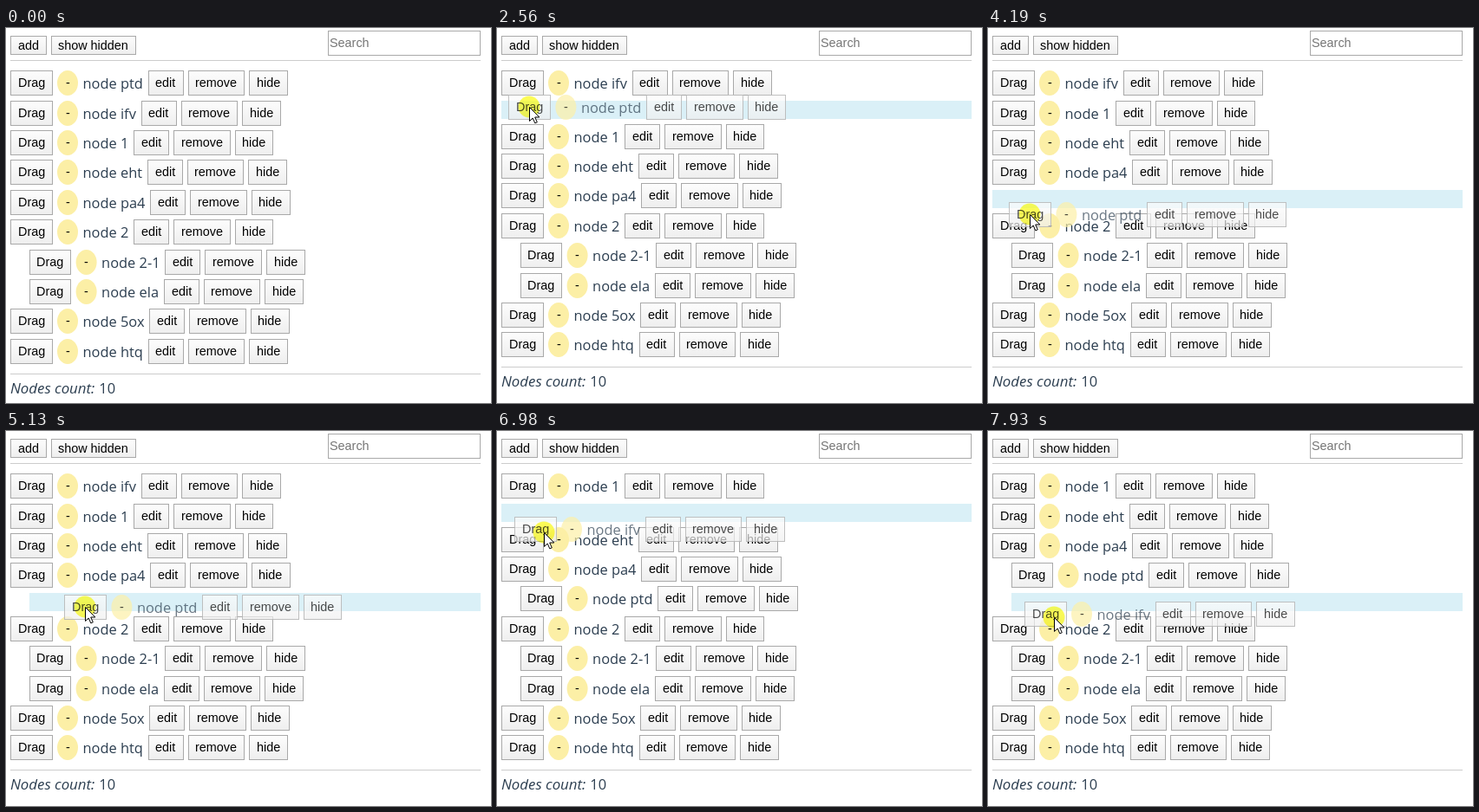
An HTML page with a canvas that plays this animation: 559x433 px, repeating every 8 s.

```html
<!DOCTYPE html>
<html lang="en">
<head>
<meta charset="utf-8">
<title>Draggable node list</title>
<style>
html, body { margin: 0; width: 559px; height: 433px; overflow: hidden; background: #fff; }
canvas { display: block; }
</style>
</head>
<body>
<canvas id="stage" width="559" height="433"></canvas>
<script>
const ctx = document.getElementById('stage').getContext('2d');
const LOOP = 8000;
const LEFT = 5, RIGHT = 547, INDENT = 21.6, GAP = 5;
const TOP = 49.35, PITCH = 34.38, ROW_H = 29, SLOT_H = 21.6, SLOT_SHIFT = -7.5;
const BUTTON_FONT = '14.4px "Liberation Sans", Arial, sans-serif';
const NODE_FONT = '16.4px "Open Sans", "Noto Sans", sans-serif';
const COUNT_FONT = 'italic 16.9px "Open Sans", "Noto Sans", sans-serif';
const INK = '#2c3e50';

const node = (name, depth = 0) => ({ name, depth });
const ptd = node('ptd'), ifv = node('ifv');
const middle = ['1', 'eht', 'pa4'].map(name => node(name));
const tail = [node('2'), node('2-1', 1), node('ela', 1), node('5ox'), node('htq')];
const before = [ptd, ifv, ...middle, ...tail];
const after = [ifv, ...middle, node('ptd', 1), ...tail];

const drags = [
  { press: 2030, start: 2110, end: 5360, item: ptd, grabX: 23.6, grabY: 14 },
  { press: 6600, start: 6670, end: LOOP, item: ifv, grabX: 34, grabY: 18 }
];

// The pointer rests between these moves.
const entry = { x: 410, y: 440 };
const moves = [
  { from: 0, to: 840, x: 146, y: 266 },
  { from: 840, to: 1630, x: 30, y: 87 },
  { from: 1650, to: 1880, x: 29, y: 63 },
  { from: 2110, to: 3180, x: 51, y: 136 },
  { from: 3180, to: 3790, x: 47, y: 180 },
  { from: 3880, to: 4300, x: 48, y: 222 },
  { from: 4440, to: 5130, x: 91, y: 203 },
  { from: 5290, to: 5670, x: 92, y: 231 },
  { from: 5750, to: 6450, x: 41, y: 69 },
  { from: 6600, to: 7370, x: 67, y: 166 },
  { from: 7380, to: 7930, x: 76, y: 215 }
];

function pointerAt(t) {
  let { x, y } = entry;
  for (const move of moves) {
    const k = Math.min(1, Math.max(0, (t - move.from) / (move.to - move.from)));
    const eased = k * k * (3 - 2 * k);
    x += (move.x - x) * eased;
    y += (move.y - y) * eased;
  }
  return { x: Math.round(x), y: Math.round(y) };
}

// Draws text and returns its width.
function text(str, x, y, font, color) {
  ctx.font = font;
  ctx.fillStyle = color;
  ctx.fillText(str, x, y);
  return ctx.measureText(str).width;
}

function rect(x, y, w, h, color) {
  ctx.fillStyle = color;
  ctx.fillRect(x, y, w, h);
}

const inside = (p, x, y, w, h) => p && p.x >= x && p.x < x + w && p.y >= y && p.y < y + h;

// Draws a button and returns where the next one starts.
function button(label, left, y, h, pointer) {
  ctx.font = BUTTON_FONT;
  const right = left + ctx.measureText(label).width + 17.6;
  const x = Math.round(left), w = Math.round(right) - x;
  const shade = ctx.createLinearGradient(0, y, 0, y + h);
  shade.addColorStop(0, '#fdfdfd');
  shade.addColorStop(1, '#eee');
  rect(x, y, w, h, shade);
  ctx.lineWidth = 1;
  ctx.strokeStyle = inside(pointer, x, y, w, h) ? '#666' : '#a9a9a9';
  ctx.strokeRect(x + 0.5, y + 0.5, w - 1, h - 1);
  text(label, Math.round(left + 8.7), Math.round(y + h / 2 + 4.5), BUTTON_FONT, '#000');
  return right + GAP;
}

function row(item, x, y, pointer) {
  if (inside(pointer, x, y, RIGHT - x, ROW_H)) rect(x, y, RIGHT - x, ROW_H, '#f4f4f4');
  button('Drag', x, y, ROW_H, pointer);
  ctx.fillStyle = '#fcefa6';
  ctx.beginPath();
  ctx.ellipse(x + 66, y + 14.5, 12, 14.5, 0, 0, Math.PI * 2);
  ctx.fill();
  text('-', Math.round(x + 63.6), y + 19, BUTTON_FONT, '#000');
  const nameX = x + 83.5;
  let next = nameX + text('node ' + item.name, nameX, y + 21, NODE_FONT, INK) + 5.9;
  for (const label of ['edit', 'remove', 'hide']) {
    next = button(label, next, y, ROW_H, pointer);
  }
}

function toolbar(pointer) {
  const next = button('add', LEFT, 9, 22, pointer);
  button('show hidden', next, 9, 22, pointer);
  ctx.strokeStyle = '#a9a9a9';
  ctx.strokeRect(371.5, 3.5, 175, 28);
  text('Search', 373, 22, BUTTON_FONT, '#757575');
  rect(LEFT, 37, RIGHT - LEFT, 1, '#ccc');
}

function footer(shift) {
  rect(LEFT, 399 + shift, RIGHT - LEFT, 1, '#ccc');
  const labelW = text('Nodes count:', LEFT, 422 + shift, COUNT_FONT, INK);
  text('10', LEFT + labelW + GAP, 422 + shift, NODE_FONT, INK);
}

function list(items, slot, slotDepth, pointer) {
  items.forEach((item, i) => {
    const y = TOP + PITCH * i;
    if (i === slot) {
      const x = Math.round(LEFT + slotDepth * INDENT), top = Math.round(y);
      rect(x, top, RIGHT - x, Math.round(y + SLOT_H) - top, '#daf0f7');
    }
    const shift = i >= slot ? PITCH + SLOT_SHIFT : 0;
    row(item, LEFT + item.depth * INDENT, Math.round(y + shift), pointer);
  });
}

function drawPointer({ x, y }, pressed) {
  ctx.save();
  if (pressed) {
    ctx.globalCompositeOperation = 'multiply';
    ctx.fillStyle = '#ffff58';
    ctx.beginPath();
    ctx.arc(x, y, 12.5, 0, Math.PI * 2);
    ctx.fill();
    ctx.globalCompositeOperation = 'source-over';
  }
  ctx.translate(x + 0.5, y + 0.5);
  const arrow = new Path2D('M0 0V16L3.7 12.5L6.3 18.4L8.8 17.3L6.2 11.5H11.3Z');
  ctx.fillStyle = '#fff';
  ctx.fill(arrow);
  ctx.strokeStyle = '#000';
  ctx.stroke(arrow);
  ctx.restore();
}

function draw(t) {
  const pointer = pointerAt(t);
  const drag = drags.find(d => t >= d.start && t < d.end);
  const pressed = drags.some(d => t >= d.press && t < d.end);
  const hover = drag ? null : pointer;
  let items = t < drags[0].end ? before : after;
  let slot = Infinity, slotDepth = 0;
  if (drag) {
    items = items.filter(item => item !== drag.item);
    slot = Math.max(0, Math.floor((pointer.y - 53) / PITCH));
    slotDepth = slot >= 3 && pointer.x > 60 ? 1 : 0;
  }

  rect(0, 0, 559, 433, '#fff');
  toolbar(hover);
  list(items, slot, slotDepth, hover);
  footer(drag ? -8 : 0);
  if (drag) {
    ctx.globalAlpha = 0.7;
    row(drag.item, pointer.x - drag.grabX, pointer.y - drag.grabY, null);
    ctx.globalAlpha = 1;
  }
  drawPointer(pointer, pressed);
}

const began = performance.now();
function frame() {
  draw((performance.now() - began) % LOOP);
  requestAnimationFrame(frame);
}
frame();
</script>
</body>
</html>
```
